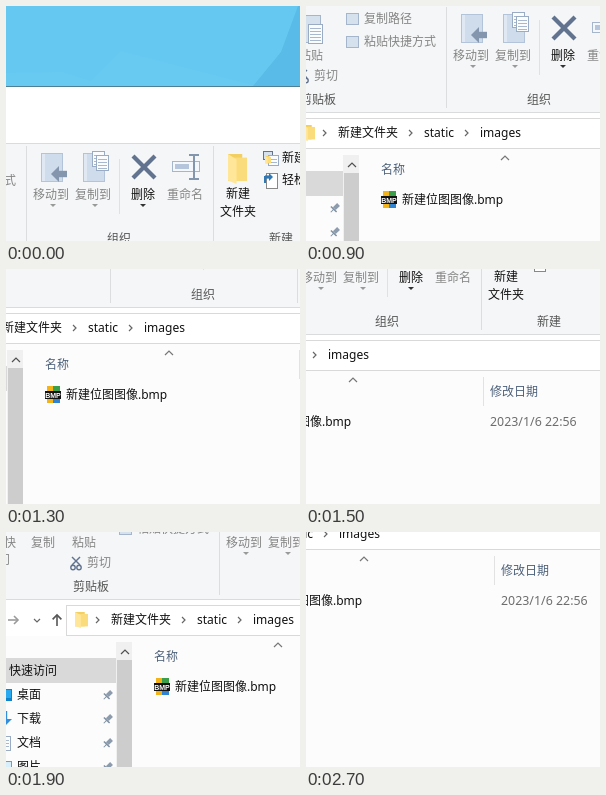
Animation of 294x235 px, one loop 3.5 s. Source, as an HTML page with a canvas:

```html
<!DOCTYPE html>
<html lang="zh-CN">
<head>
<meta charset="utf-8">
<title>文件夹窗口</title>
<style>
html, body { margin: 0; width: 100%; height: 100%; overflow: hidden; background: #fff; }
canvas { display: block; }
</style>
</head>
<body>
<canvas id="stage" width="294" height="235"></canvas>
<script>
const ctx = document.getElementById('stage').getContext('2d');
const LOOP = 3500, STEP = 100, START = 700, LEG = 400;
const LEFT = -240, WIDE = 600;
const CAPTION_Y = 189, LINE = 17, GROUP_Y = 233, PATH_Y = 266;
const GREY = '#858585', INK = '#111', HEAD = '#4c607a', SLATE = '#62738f';
const PALE = '#8495ae', EDGE = '#a5b5cc', TINT = '#d6e1ee';

// The camera passes one stop per leg
const stops = [[18, -16], [200, -234], [-32, -180], [193, -178], [0, -264], [-21, -264]];

function slope(i, axis) {
  const rate = k => stops[k + 1][axis] - stops[k][axis];
  if (i === 0) return rate(0) / 2;
  if (i === stops.length - 1) return 0;
  const a = rate(i - 1), b = rate(i);
  return a * b <= 0 ? 0 : 2 * a * b / (a + b);
}

// Monotone cubic interpolation, so the camera never overshoots
function camera(t, axis) {
  if (t < START) return 0;
  const progress = Math.min((t - START) / LEG, stops.length - 1);
  const i = Math.min(Math.floor(progress), stops.length - 2), u = progress - i;
  const ease = u * u * (3 - 2 * u);
  return Math.round(stops[i][axis] * (1 - ease) + stops[i + 1][axis] * ease
    + u * (1 - u) ** 2 * slope(i, axis) - u * u * (1 - u) * slope(i + 1, axis));
}

const setFont = size => ctx.font = `${size}px "Noto Sans", "Noto Sans CJK SC", sans-serif`;

function rect(x, y, w, h, color) {
  ctx.fillStyle = color;
  ctx.fillRect(x, y, w, h);
}

function frame(x, y, w, h, fill, edge) {
  rect(x, y, w, h, edge);
  rect(x + 1, y + 1, w - 2, h - 2, fill);
}

function trace(points) {
  ctx.beginPath();
  for (let i = 0; i < points.length; i += 2) ctx.lineTo(points[i], points[i + 1]);
}

function poly(color, ...points) {
  trace(points);
  ctx.fillStyle = color;
  ctx.fill();
}

function line(color, width, ...points) {
  trace(points);
  ctx.strokeStyle = color;
  ctx.lineWidth = width;
  ctx.stroke();
}

// Runs draw() with the origin at x, y and the axes turned
function place(x, y, angle, draw) {
  ctx.save();
  ctx.translate(x, y);
  ctx.rotate(angle);
  draw();
  ctx.restore();
}

function text(str, x, y, color = INK, align = 'left') {
  ctx.fillStyle = color;
  ctx.textAlign = align;
  ctx.fillText(str, x, y + 4);
}

const label = (str, x, y, color) => text(str, x, y, color, 'center');
const dropMark = (x, color) => poly(color, x - 3, 198, x + 3, 198, x, 201);

function chevron(x, y, angle = 0, size = 3, color = '#666', width = 1.2) {
  place(x, y, angle, () => line(color, width, -size, -size, 0, 0, -size, size));
}

function blockArrow(x, y, angle, size, color) {
  place(x, y, angle, () => {
    poly(color, size, 0, 0, -size, 0, size);
    rect(-size, -size * 0.4, size + 1, size * 0.8, color);
  });
}

function thinArrow(x, y, angle, size, color) {
  place(x, y, angle, () => line(color, 1.6, -size * 2, 0, 0, 0));
  chevron(x, y, angle, size * 0.8, color, 1.6);
}

function cross(x, y, r, width) {
  for (const side of [-1, 1]) line(SLATE, width, x - side * r, y - r, x + side * r, y + r);
}

function folder(x, y, w, h) {
  rect(x, y, w * 0.75, h * 0.9, '#f3cf62');
  rect(x + w * 0.25, y + h * 0.12, w * 0.75, h * 0.78, '#fbdc7c');
  poly('#ffe699', x, y, x + w * 0.45, y + h * 0.18, x + w * 0.45, y + h, x, y + h * 0.88);
}

function sheet(x, y, w, h) {
  frame(x, y, w, h, '#fbfcfe', '#9aabc4');
  for (let row = y + 4; row < y + h - 2; row += 3) rect(x + 2, row, w - 4, 1, '#a8b8ce');
}

function book(x, y) {
  frame(x, y, 22, 29, '#cfdcec', '#b3c3d9');
  rect(x + 1, y + 1, 3, 27, '#dfe8f3');
}

function drawDesktop() {
  rect(LEFT, 0, WIDE, 80, '#64c8f0');
  poly('#69caf1', LEFT, 72, 55, 66, 85, 75, 115, 45, 250, 80, LEFT, 80);
  poly('#59bbe7', 247, 80, 275, 46, 292, 0, 340, 0, 340, 80);
  rect(LEFT, 80, WIDE, 1, '#4f7f95');
}

function drawClipboardGroup() {
  label('固定到快', -207, CAPTION_Y, GREY);
  label('速访问', -207, CAPTION_Y + LINE, GREY);

  for (const step of [0, 8]) sheet(-168 + step, 147 + step, 17, 23);
  label('复制', -156, CAPTION_Y, GREY);

  frame(-127, 148, 22, 28, TINT, EDGE);
  sheet(-118, 157, 15, 20);
  label('粘贴', -115, CAPTION_Y, GREY);

  cross(-123, 207, 4, 1.4);
  for (const x of [-126, -120]) {
    ctx.beginPath();
    ctx.arc(x, 213.5, 2.2, 0, 7);
    ctx.stroke();
  }
  text('剪切', -112, 209, GREY);

  ['复制路径', '粘贴快捷方式'].forEach((name, i) => {
    const y = 152 + i * 23;
    frame(-80, y - 6, 13, 12, TINT, EDGE);
    text(name, -62, y, GREY);
  });
  label('剪贴板', -108, GROUP_Y, '#555');
}

function drawOrganizeGroup() {
  for (const [name, x] of [['移动到', 45], ['复制到', 87]]) {
    book(x - 10, 147);
    label(name, x, CAPTION_Y, GREY);
    dropMark(x + 2, '#999');
  }
  blockArrow(53, 168, Math.PI, 8, PALE);
  for (const step of [0, 4]) sheet(86 + step, 145 + step, 13, 16);

  rect(113, 153, 1, 55, '#e0e1e2');
  cross(138, 161, 11, 4.2);
  label('删除', 137, CAPTION_Y);
  dropMark(137, '#333');

  frame(166, 155, 28, 11, '#f4f7fb', EDGE);
  rect(169, 158, 14, 5, '#b4c5dc');
  rect(187, 149, 2, 24, PALE);
  for (const y of [148, 172]) rect(183, y, 10, 2, PALE);
  label('重命名', 179, CAPTION_Y, GREY);
  label('组织', 113, GROUP_Y, '#555');
}

function drawNewGroup() {
  folder(222, 148, 19, 30);
  label('新建', 232, CAPTION_Y - 1);
  label('文件夹', 232, CAPTION_Y + LINE);

  frame(257, 145, 10, 9, TINT, SLATE);
  sheet(262, 149, 11, 11);
  folder(259, 150, 6, 8);
  text('新建项目', 276, 152);

  frame(260, 167, 12, 16, '#fff', '#888');
  rect(258, 170, 2, 7, '#2f77b5');
  blockArrow(263, 171, 0, 4, '#2f77b5');
  text('轻松访问', 276, 174);
  label('新建', 275, GROUP_Y, '#555');
}

function drawRibbon() {
  rect(LEFT, 137, WIDE, 109, '#dadbdc');
  rect(LEFT, 138, WIDE, 107, '#f5f6f7');
  for (const x of [20, 207]) rect(x, 140, 1, 101, '#dcdddf');
  drawClipboardGroup();
  drawOrganizeGroup();
  drawNewGroup();
}

function drawAddressBar() {
  frame(-133, 251, WIDE, 31, '#fff', '#d9d9d9');
  thinArrow(-181, PATH_Y, 0, 5, '#9a9a9a');
  chevron(-162, PATH_Y + 2, Math.PI / 2);
  thinArrow(-142, PATH_Y - 5, -Math.PI / 2, 5.5, '#555');
  folder(-124, 258, 13, 16);

  const gap = 13;
  let x = -101;
  for (const crumb of ['新建文件夹', 'static', 'images']) {
    chevron(x + 1, PATH_Y);
    text(crumb, x + gap, PATH_Y);
    x = Math.round(x + gap * 2 + ctx.measureText(crumb).width - 0.5);
  }
}

function pin(x, y) {
  place(x, y, Math.PI / 4, () => {
    rect(-2, -5, 4, 6, '#8c9cac');
    rect(-4, 1, 8, 1.5, '#7d8fa1');
    rect(-0.5, 2, 1, 4, '#7d8fa1');
  });
}

// Each icon is drawn around the middle of its row
const places = {
  '桌面': () => {
    rect(-8, -6, 16, 12, '#0d83cc');
    rect(-7, -5, 14, 8, '#29a9ef');
  },
  '下载': () => blockArrow(0, 0, Math.PI / 2, 8, '#2f8fdd'),
  '文档': () => sheet(-6, -7, 13, 15),
  '图片': () => {
    frame(-8, -6, 16, 13, '#d8eefb', '#8995a1');
    poly('#3c8f9d', -6, 5, -1, -2, 6, 5);
  },
  '回收站': () => {
    poly('#cfdae3', -7, -6, 7, -6, 5, 8, -5, 8);
    rect(-3, -1, 6, 5, '#3c91cf');
  },
  'lx': () => folder(-7, -8, 13, 16)
};

function star(x, y, r, color) {
  const points = [];
  for (let i = 0; i < 10; i++) {
    const reach = i % 2 ? r * 0.45 : r, angle = i * Math.PI / 5 - Math.PI / 2;
    points.push(x + reach * Math.cos(angle), y + reach * Math.sin(angle));
  }
  poly(color, ...points);
}

function drawNavigation() {
  rect(LEFT, 304, -83 - LEFT, 25, '#d9d9d9');
  star(-202, 317, 8, '#2b8ad6');
  text('快速访问', -190, 317);
  Object.entries(places).forEach(([name, icon], i) => {
    const y = 341 + i * 24;
    place(-195, y, 0, icon);
    text(name, -182, y);
    pin(-91, y);
  });
  rect(-83, 288, 16, 230, '#f0f0f0');
  rect(-82, 306, 15, 212, '#cdcdcd');
  chevron(-74, 296, -Math.PI / 2, 4, '#505050');
}

function drawBitmapIcon(x, y) {
  rect(x + 2, y, 13, 17, '#f3b41b');
  rect(x + 8, y, 7, 8, '#3b9e4a');
  rect(x + 8, y + 12, 7, 5, '#2f83d0');
  rect(x, y + 5, 16, 8, '#111');
  ctx.font = 'bold 7px "Liberation Sans", sans-serif';
  ctx.fillStyle = '#fff';
  ctx.textAlign = 'center';
  ctx.fillText('BMP', x + 8, y + 11.5);
}

function drawFiles() {
  const headY = 303, rowY = 333;
  text('名称', -45, headY, HEAD);
  chevron(79, 289, -Math.PI / 2, 4, '#777');
  rect(209, 288, 1, 29, '#e2e2e2');
  text('修改日期', 216, headY, HEAD);
  drawBitmapIcon(-45, 324);
  setFont(12);
  text('新建位图图像.bmp', -24, rowY);
  setFont(12.4);
  text('2023/1/6 22:56', 216, rowY, '#6d6d6d');
}

function render(now) {
  const t = Math.floor(now % LOOP / STEP) * STEP;
  ctx.setTransform(1, 0, 0, 1, 0, 0);
  rect(0, 0, 294, 235, '#fff');
  ctx.translate(camera(t, 0), camera(t, 1));
  rect(LEFT, 282, WIDE, 240, '#fcfcfc');
  setFont(12);
  drawDesktop();
  drawRibbon();
  drawAddressBar();
  drawNavigation();
  drawFiles();
}

const start = performance.now();
function tick() {
  render(performance.now() - start);
  requestAnimationFrame(tick);
}
tick();
</script>
</body>
</html>
```
